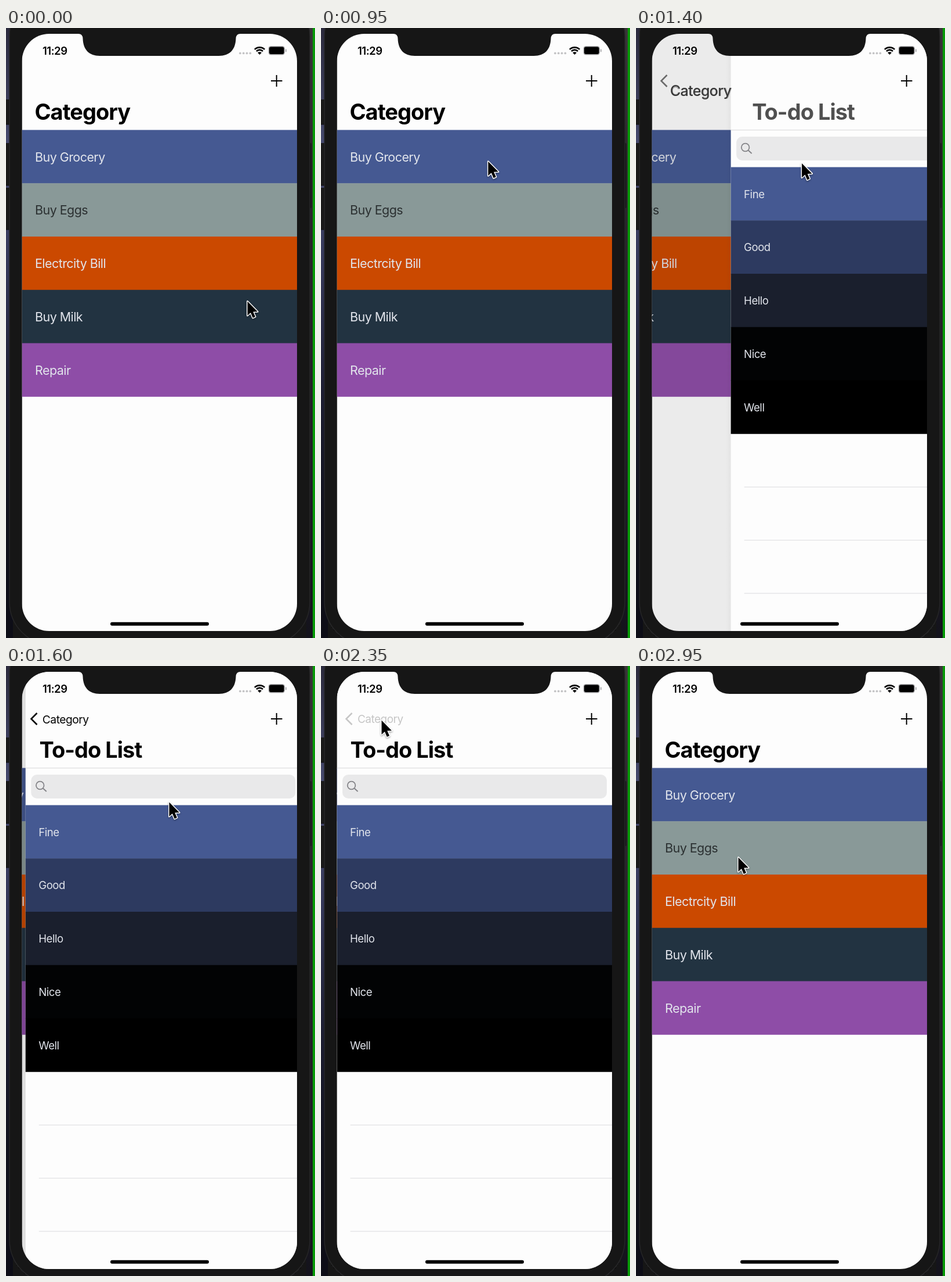
An HTML page with a canvas for the animation above (3 s loop, 533x1050 px).

```html
<!DOCTYPE html>
<html lang="en">
<head>
<meta charset="utf-8">
<title>To-do app</title>
<style>
  html, body { margin: 0; width: 100%; height: 100%; overflow: hidden; background: #161616; }
  canvas { display: block; }
</style>
</head>
<body>
<canvas id="stage" width="533" height="1050"></canvas>
<script>
const ctx = document.getElementById('stage').getContext('2d');
const LOOP = 3000, STEP = 50;
const LEFT = 27.5, TOP = 10, WIDTH = 474.5, HEIGHT = 1028;
const ROW = 91.75, NAV_BOTTOM = 175.5, LIST_TOP = 239.5;
const PUSH_AT = 1269, POP_AT = 2372, TITLE_DELAY = 7;
const WHITE = '#fdfdfd';

const categories = [
  ['Buy Grocery', '#455992'], ['Buy Eggs', '#899998', '#2b3031'],
  ['Electrcity Bill', '#cb4900'], ['Buy Milk', '#223341'], ['Repair', '#8e4da7']
];
const todos = [
  ['Fine', '#455992'], ['Good', '#2d3a60'], ['Hello', '#1a1f2d'],
  ['Nice', '#020304'], ['Well', '#000']
];
// Pointer path: time, x, y
const pointerPath = [
  [0, 416, 470], [520, 289, 228], [1250, 287, 231], [1600, 281, 234],
  [2270, 104, 93], [2380, 104, 93], [2550, 121, 113], [2950, 176, 329]
];

const lerp = (a, b, k) => a + (b - a) * k;

// Critically damped spring from 0 to 1
function spring(ms) {
  const u = Math.max(0, ms) * 0.0191;
  return 1 - (1 + u) * Math.exp(-u);
}
const pushed = t => t < POP_AT ? spring(t - PUSH_AT) : 1 - spring(t - POP_AT);

// Monotone cubic interpolation along one axis of the pointer path
function pointerAxis(t, axis) {
  const path = pointerPath, last = path.length - 1;
  const slope = i => (path[i + 1][axis] - path[i][axis]) / (path[i + 1][0] - path[i][0]);
  const tangent = i => {
    if (i === 0 || i === last) return 0;
    const a = slope(i - 1), b = slope(i);
    return a * b <= 0 ? 0 : 2 * a * b / (a + b);
  };
  if (t >= path[last][0]) return path[last][axis];
  const i = path.findIndex((key, n) => t < path[n + 1][0]);
  const span = path[i + 1][0] - path[i][0], k = (t - path[i][0]) / span;
  const ease = k * k * (3 - 2 * k);
  return lerp(path[i][axis], path[i + 1][axis], ease)
    + span * k * (1 - k) * ((1 - k) * tangent(i) - k * tangent(i + 1));
}

function rect(x, y, w, h, fill, radius = 0) {
  ctx.fillStyle = fill;
  ctx.beginPath();
  ctx.roundRect(x, y, w, h, radius);
  ctx.fill();
}

// Text whose capitals are centred on y
function text(str, x, y, size, weight, fill, alpha = 1) {
  ctx.globalAlpha = alpha;
  ctx.font = `${weight} ${size}px Inter, sans-serif`;
  ctx.letterSpacing = `${-0.026 * size}px`;
  ctx.fillStyle = fill;
  ctx.fillText(str, x, y + size * 0.364);
  ctx.globalAlpha = 1;
}

function line(points, color, width) {
  ctx.strokeStyle = color;
  ctx.lineWidth = width;
  ctx.beginPath();
  points.forEach(([x, y]) => ctx.lineTo(x, y));
  ctx.stroke();
}

function gradient(x0, y0, x1, y1, ...colors) {
  const g = ctx.createLinearGradient(x0, y0, x1, y1);
  colors.forEach((c, i) => g.addColorStop(i / (colors.length - 1), c));
  return g;
}

function rows(items, x, top, size, textX) {
  items.forEach(([label, color, ink = '#e2e5ec'], i) => {
    const y = top + i * ROW;
    rect(x, y, WIDTH + 200, ROW + 0.5, color);
    text(label, textX, y + ROW / 2 + 0.5, size, 400, ink);
  });
}

function drawPhone() {
  rect(0, 0, 12, 1050, gradient(0, 0, 0, 1050, '#2b2a3c', '#474b70', '#343758', '#1d1e32', '#11121d', '#0d0d16'));
  rect(518, 0, 12, 1050, gradient(0, 0, 0, 1050, '#3a3439', '#2c272d', '#272329', '#1f1c25', '#14131c'));
  rect(529, 0, 4, 1050, '#079807');
  for (const [y, h] of [[123, 43], [198, 73], [275, 72]]) {
    rect(-4, y, 14, h, '#191919', 2);
    line([[0, y + h], [7, y + h]], '#0a0a0c', 1);
  }
  rect(520, 198, 7, 112, '#1b1a1c', 2);
  rect(6, -60, 518, 1122, '#161616', 74);
  ctx.strokeStyle = '#262627';
  ctx.lineWidth = 1.5;
  ctx.stroke();
}

function drawCategoryPage(progress) {
  const shift = -0.3 * WIDTH * progress;
  rect(LEFT, TOP, WIDTH, HEIGHT, WHITE);
  rows(categories, LEFT + shift, NAV_BOTTOM, 21.5, 50 + shift);
  rect(LEFT, TOP, WIDTH, HEIGHT, `rgba(0,0,0,${0.1 * progress})`);
}

function drawListPage(progress) {
  const shift = WIDTH * (1 - progress), x = LEFT + shift;
  if (progress < 0.001) return;
  rect(x - 9, TOP, 9, HEIGHT, gradient(x - 9, 0, x, 0, 'rgba(0,0,0,0)', 'rgba(0,0,0,.03)'));
  rect(x, TOP, WIDTH, HEIGHT, WHITE);
  rect(x, NAV_BOTTOM - 0.5, WIDTH, 1.2, '#dededf');
  rect(x + 9.5, 187, 456, 41, '#e9e9ea', 10);
  ctx.strokeStyle = '#858589';
  ctx.lineWidth = 1.8;
  ctx.beginPath();
  ctx.arc(x + 25, 205.5, 6.8, 0, 7);
  ctx.stroke();
  line([[x + 30, 210.5], [x + 36, 216]], '#858589', 2);
  rows(todos, x, LIST_TOP, 18.6, x + 22.5);
  for (const y of [790, 881.5, 973]) rect(x + 23, y - 0.5, WIDTH, 1.3, '#e2e2e4');
}

function drawNavigation(t) {
  const q = pushed(t - (t < POP_AT ? TITLE_DELAY : Math.min(TITLE_DELAY, t - POP_AT)));
  const scale = lerp(1, 0.482, q), x = lerp(49.5, 63, q), y = lerp(144, 91, q);
  const dim = t >= 2290 && t < POP_AT ? 0.22 : 1;
  text('Category', x, y, 38 * scale, 700, '#000', 1 - q);
  text('Category', x, y, 39.3 * scale, 400, '#000', q * dim);
  ctx.globalAlpha = Math.max(0, (q - 0.3) / 0.7) * dim;
  line([[53.5, 81], [43.5, 91], [53.5, 101]], '#000', 2.6);
  ctx.globalAlpha = 1;
  const fade = gradient(478, 0, 499, 0, '#000', 'rgba(0,0,0,0)');
  text('To-do List', 50.5 + WIDTH * (1 - q), 144, 38, 700, fade, q);
  line([[457, 91], [476.5, 91]], '#000', 2);
  line([[466.7, 81], [466.7, 101]], '#000', 2);
}

function drawStatusBar() {
  // Notch with flared shoulders
  ctx.fillStyle = '#161616';
  ctx.beginPath();
  ctx.moveTo(125, 9);
  ctx.lineTo(125, 10);
  ctx.quadraticCurveTo(132, 10, 132.5, 18);
  ctx.bezierCurveTo(133, 37, 143, 48, 162, 48);
  ctx.lineTo(367, 48);
  ctx.bezierCurveTo(386, 48, 396, 37, 396.5, 18);
  ctx.quadraticCurveTo(397, 10, 404, 10);
  ctx.lineTo(404, 9);
  ctx.fill();

  text('11:29', 63, 39, 18.5, 600, '#000');
  for (let i = 0; i < 4; i++) rect(402 + i * 5.8, 41.5, 3.8, 3.8, '#c3c3c5', 1.9);
  ctx.strokeStyle = '#000';
  ctx.lineWidth = 2.7;
  for (const r of [7.8, 12.2]) {
    ctx.beginPath();
    ctx.arc(437.5, 45.5, r, -Math.PI * 0.75, -Math.PI * 0.25);
    ctx.stroke();
  }
  ctx.fillStyle = '#000';
  ctx.beginPath();
  ctx.moveTo(437.5, 46);
  ctx.arc(437.5, 46, 4.8, -Math.PI * 0.75, -Math.PI * 0.25);
  ctx.fill();
  rect(452.5, 31, 28.5, 15.5, '#aaaaac', 4.5);
  rect(454, 32.5, 25.5, 12.5, '#000', 3);
  rect(482, 36.3, 1.8, 5, '#aaaaac', 1);
}

function drawPointer(x, y) {
  ctx.save();
  ctx.translate(x, y);
  ctx.beginPath();
  for (const [px, py] of [[0.5, 0.5], [0.5, 25], [6, 20], [9.8, 29], [14, 27], [10.2, 18.5], [18, 18.2]]) ctx.lineTo(px, py);
  ctx.closePath();
  ctx.shadowColor = 'rgba(0,0,0,.35)';
  ctx.shadowBlur = 3;
  ctx.shadowOffsetY = 1.5;
  ctx.lineJoin = 'round';
  ctx.lineWidth = 3;
  ctx.strokeStyle = '#fff';
  ctx.stroke();
  ctx.shadowColor = 'transparent';
  ctx.fillStyle = '#000';
  ctx.fill();
  ctx.restore();
}

function draw(now) {
  const t = Math.floor((now % LOOP) / STEP) * STEP;
  const progress = pushed(t);
  drawPhone();
  ctx.save();
  ctx.beginPath();
  ctx.roundRect(LEFT, TOP, WIDTH, HEIGHT, 47);
  ctx.clip();
  drawCategoryPage(progress);
  drawListPage(progress);
  drawNavigation(t);
  drawStatusBar();
  rect(180, 1022.8, 170, 6, '#000', 3);
  ctx.restore();
  drawPointer(pointerAxis(t, 1), pointerAxis(t, 2));
  requestAnimationFrame(draw);
}
requestAnimationFrame(draw);
</script>
</body>
</html>
```
